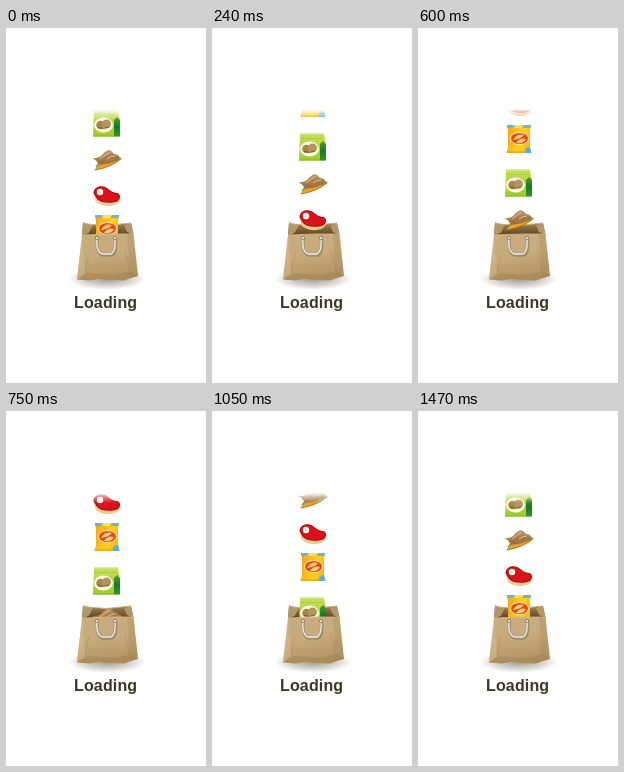
These frames come from a looping animation (200x355 px, 1500 ms). An HTML page:

```html
<!DOCTYPE html>
<html lang="en">
<head>
<meta charset="utf-8">
<title>Loading</title>
<style>
html, body { margin: 0; width: 100%; height: 100%; overflow: hidden; background: #fff; }
svg { display: block; width: 100%; height: 100%; }
.item { animation: fall 1500ms steps(50) infinite; animation-delay: calc(var(--step) * -30ms - 1ms); }
@keyframes fall {
  from { transform: translate(101px, 69px); }
  to { transform: translate(101px, 219px); }
}
.label { font: bold 16px "Liberation Sans", Arial, sans-serif; letter-spacing: .15px; fill: #3b372d; }
</style>
</head>
<body>
<svg viewBox="0 0 200 355">
  <defs>
    <linearGradient id="fade" x2="0" y2="1">
      <stop stop-color="#fff" stop-opacity=".9"/>
      <stop offset=".4" stop-color="#fff" stop-opacity=".5"/>
      <stop offset="1" stop-color="#fff" stop-opacity="0"/>
    </linearGradient>
    <linearGradient id="paper" x2=".2" y2="1">
      <stop stop-color="#c8ad7f"/>
      <stop offset=".5" stop-color="#c7ab7c"/>
      <stop offset="1" stop-color="#b39562"/>
    </linearGradient>
    <linearGradient id="inside" x2="0" y2="1">
      <stop stop-color="#a5875a"/>
      <stop offset=".45" stop-color="#82663b"/>
      <stop offset="1" stop-color="#58401f"/>
    </linearGradient>
    <linearGradient id="lime" x2="0" y2="1">
      <stop stop-color="#c9de55"/>
      <stop offset="1" stop-color="#9ecb2c"/>
    </linearGradient>
    <linearGradient id="side" x2="0" y2="1">
      <stop stop-color="#4f9f2c"/>
      <stop offset=".5" stop-color="#187a22"/>
      <stop offset="1" stop-color="#2f9a2c"/>
    </linearGradient>
    <linearGradient id="pack" x2="1" y2=".3">
      <stop stop-color="#f59a17"/>
      <stop offset=".3" stop-color="#fbb51b"/>
      <stop offset=".7" stop-color="#ffd21f"/>
      <stop offset="1" stop-color="#fbb81a"/>
    </linearGradient>
    <linearGradient id="roast" x2=".3" y2="1">
      <stop stop-color="#c7a172"/>
      <stop offset="1" stop-color="#96683a"/>
    </linearGradient>
    <radialGradient id="shadow">
      <stop stop-color="#4f4638" stop-opacity=".55"/>
      <stop offset=".6" stop-color="#5d5140" stop-opacity=".25"/>
      <stop offset="1" stop-color="#5d5140" stop-opacity="0"/>
    </radialGradient>
  </defs>

  <ellipse cx="101" cy="251" rx="39" ry="11" fill="url(#shadow)"/>
  <path d="M77 194.500 81 196 100 197.500 125 195 127.500 207 76 208Z" fill="url(#inside)"/>
  <path d="M77 194.500 76 208 83 204.500 87 197ZM125 195 127.500 207 121 204 118 197Z" fill="#b3966a"/>
  <path d="M77 194.700 81 196 100 197.500 125 195" fill="none" stroke="#ccb184"/>

  <g class="item" style="--step:9">
    <path d="M-13-14.500H11L12.500-5V12.500H-14Z" fill="url(#lime)"/>
    <path d="M10-7 13-4V12.500H7V-4Z" fill="url(#side)"/>
    <path d="M-12.500-14H11" stroke="#dcea9a"/>
    <path d="M-13-9.500H10" stroke="#a5c83e" stroke-width=".7"/>
    <path d="M-14 12H7" stroke="#86b52a"/>
    <ellipse cx="-3.500" cy="1" rx="9.500" ry="7.500" fill="#fffbe6"/>
    <circle cx="-6.500" cy="1" r="4.300" fill="#a5874c"/>
    <circle cx="-.5" cy="0" r="4.500" fill="#b4965c"/>
    <path d="M-9 3Q-4 6 2 3" fill="none" stroke="#7d602f"/>
  </g>

  <g class="item" style="--step:21">
    <path d="M-13 10.500-8 4 13-3 15-1Q4 7-13 10.500Z" fill="#eda02a"/>
    <path d="M-12 10Q5 7 14-1.500" fill="none" stroke="#a65f17" stroke-width=".8"/>
    <path d="M-15-1.500Q-9-2-6-4Q-2-9 2-10Q5-9 7-6Q11-6 13-2Q8 2-1 4L-9 5Q-9 0-15-1.500Z" fill="url(#roast)"/>
    <path d="M-5 4Q-1-1 4-3Q9-4 10-1Q5 3-5 4" fill="#a57744"/>
    <path d="M-7-1Q-2-5 3-8M0-1Q4-4 8-4" fill="none" stroke="#e0c49b" stroke-width=".9"/>
    <path d="M-11 7-7 3M9 1 12-2" stroke="#73913a" stroke-width="1.500"/>
  </g>

  <g class="item" style="--step:33">
    <path d="M-13.500-3C-13-9-7-11-2-9C2-7 5-3 10-3C15-2 14 5 10 8C3 12-8 10-11.500 5Z" fill="#f5c98c"/>
    <path d="M-13.500-3C-13-9-7-11-2-9C2-7 5-3 10-3C14-2 14 3 10 5.500C3 8-6 7-10 3Z" fill="#a00d15"/>
    <path d="M-12.500-3.500C-12-8-7-10-2-8C2-6 5-2 10-2C13-1 13 3 9 4.500C3 7-6 6-9 2Z" fill="#db121c"/>
    <circle cx="-7" cy="-4" r="3.200" fill="#fff8ec"/>
    <circle cx="-7" cy="-4" r="1" fill="#efd0b8"/>
  </g>

  <g class="item" style="--step:44">
    <path d="M-12-14H12L11-8V8L12.500 14H-12.500L-11 8V-8Z" fill="url(#pack)"/>
    <path d="M-12-14H12L11.500-11H5L-3-12-11.500-11Z" fill="#5eb9d6"/>
    <path d="M-5-14H5L3-11H-4Z" fill="#ffdf5a"/>
    <path d="M7 9 11 8 12.500 14H5Z" fill="#55b2d4"/>
    <path d="M-12.500 13H6" stroke="#f3a51d" stroke-width="1.500"/>
    <ellipse cx=".5" cy="-.500" rx="9.500" ry="6.500" fill="#ffe0a0"/>
    <ellipse cx=".5" cy="-.500" rx="8.500" ry="5.500" fill="#e4481a"/>
    <path d="M-6 1Q-2-6 5-4Q2 0-6 1M-3 4Q1-2 7 0Q5 5-3 4" fill="#fbcf77"/>
  </g>

  <rect width="200" height="82" fill="#fff"/>
  <rect y="82" width="200" height="10" fill="url(#fade)"/>

  <path d="M76 207Q101 205.500 127.500 206L132 248Q124 250 118 252.500L104 252 92 251 84 252.500 71 251.500Z" fill="url(#paper)"/>
  <path d="M121 206H127.500L132 248 124 250Z" fill="#a48554" opacity=".3"/>
  <path d="M76 207 71 251.500 79 245Z" fill="#dac29a" opacity=".4"/>
  <path d="M71 251.500 82 245 108 247 124 243 132 248 118 252.500 92 251 84 252.500Z" fill="#8f7244" opacity=".25"/>
  <path d="M76 207Q101 205.500 127.500 206" fill="none" stroke="#d3ba8f" stroke-width=".8"/>
  <path d="M83 226 79 245M119 222 124 243" stroke="#9f8254" stroke-width=".7" opacity=".5"/>
  <g fill="none" stroke-linecap="round">
    <path d="M91.500 212Q90 227 98 227.500H105Q111 227 110 212" stroke="#7c6540" stroke-width="2.600" opacity=".45"/>
    <path d="M91 210Q89.500 224 96.500 226H104Q110 225 109 210" stroke="#96928a" stroke-width="2.400"/>
    <path d="M91 210Q89.500 224 96.500 226H104Q110 225 109 210" stroke="#efede7" stroke-width="1.300"/>
  </g>
  <g fill="#e9e5dc" stroke="#7f6a47" stroke-width=".7">
    <circle cx="91" cy="210" r="1.600"/>
    <circle cx="109" cy="210" r="1.600"/>
  </g>

  <text class="label" x="68" y="280">Loading</text>
</svg>
</body>
</html>
```
